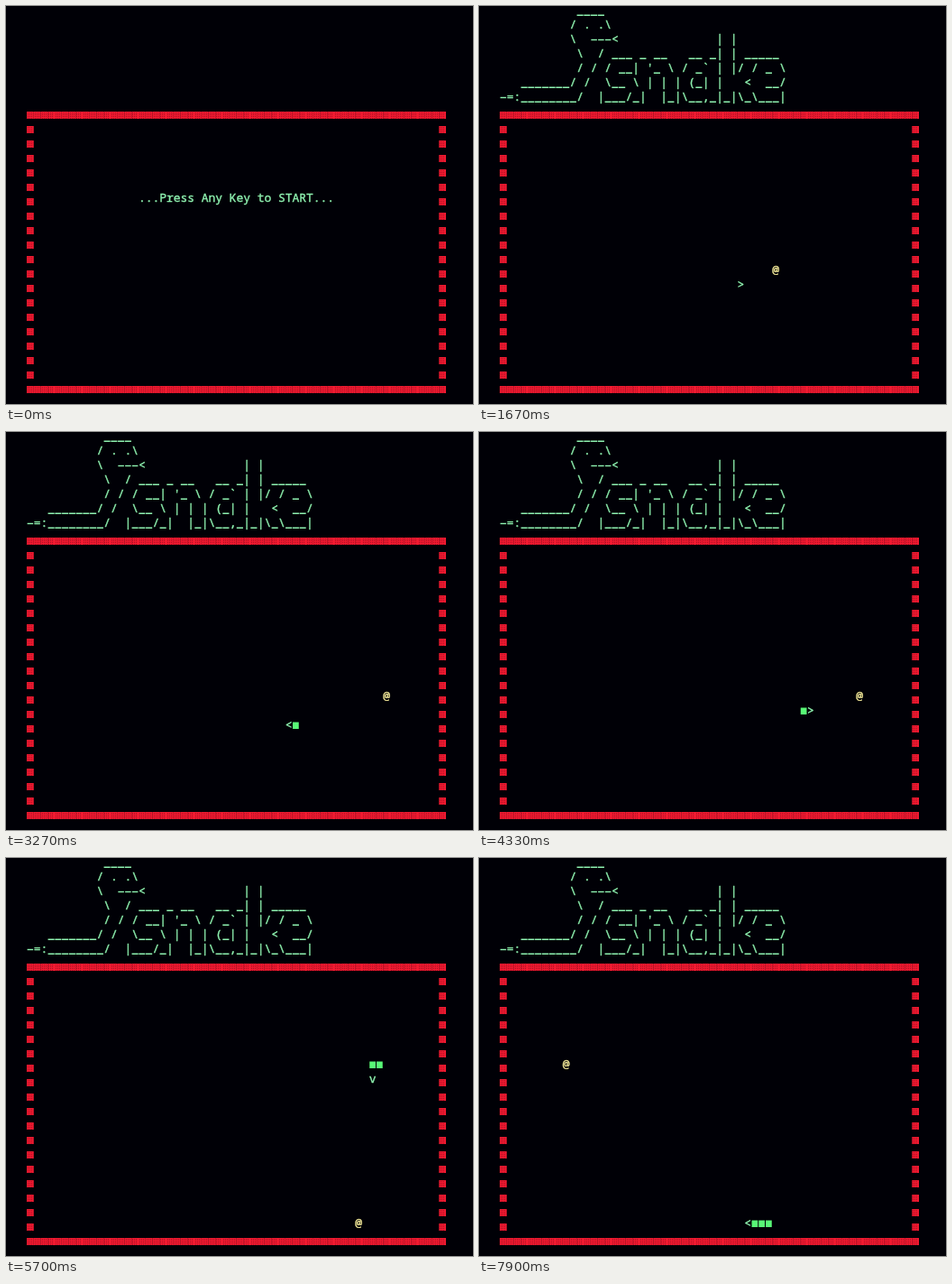
Write an HTML page with a canvas that moves like this. It is 518x441 px and loops after 8 s.

```html
<!DOCTYPE html>
<html lang="en">
<head>
<meta charset="utf-8">
<title>Terminal snake</title>
<style>
  html, body { margin: 0; width: 100%; height: 100%; overflow: hidden; background: #000006; }
  canvas { display: block; }
</style>
</head>
<body>
<canvas id="stage" width="518" height="441"></canvas>
<script>
const ctx = document.getElementById('stage').getContext('2d');
const LOOP = 8000, GAME_START = 800;
const FIRST_MOVE = 712, MOVE = 90.3;
const LEFT = 23, CELL = 7.75, LINE = 16;
const COLS = 60, TOP_ROW = 7, BOTTOM_ROW = 26;
const BACK = '#000006', MINT = '#8ef2b0', GREEN = '#58f876', YELLOW = '#f8ee9c', RED = '#f01a30';

const LOGO = [
  String.raw`           ____`,
  String.raw`          / . .\ `,
  String.raw`          \  ---<              | |`,
  String.raw`           \  / ___ _ __   __ _| | _____`,
  String.raw`           / / / __| '_ \ / _${'`'} | |/ / _ \ `,
  String.raw`   _______/ /  \__ \ | | | (_| |   <  __/`,
  String.raw`-=:________/  |___/_|  |_|\__,_|_|\_\___|`
];

// Turns of the snake: direction and number of cells
const ROUTE = 'R14 U5 R1 D6 L4 U1 R16 U5 L2 D11 L14';
const DIRS = { R: [1, 0, '>'], L: [-1, 0, '<'], U: [0, -1, '^'], D: [0, 1, 'v'] };

const path = [{ x: 24, y: 19, head: '>' }];
for (const leg of ROUTE.split(' ')) {
  const [dx, dy, head] = DIRS[leg[0]];
  for (let i = 0; i < +leg.slice(1); i++) {
    const last = path[path.length - 1];
    path.push({ x: last.x + dx, y: last.y + dy, head });
  }
}

// Steps of the path on which the snake eats; the last food stays uneaten
const MEALS = [24, 48, 67];
const food = [...MEALS.map(step => path[step]), { x: 9, y: 14 }];

const colX = col => LEFT + col * CELL;
const rowY = row => 5 + row * LINE;

function glyph(ch, col, row, color) {
  if (ch === ' ') return;
  const x = colX(col), y = rowY(row);
  ctx.fillStyle = ctx.strokeStyle = color;
  if (ch === '_') {
    ctx.fillRect(x + 0.3, y + 4.5, CELL - 0.6, 1.5);
  } else if (ch === '-') {
    ctx.fillRect(x + 0.6, y - 0.2, CELL - 1.2, 1.4);
  } else {
    ctx.fillText(ch, x + CELL / 2, y + 4.4);
    ctx.strokeText(ch, x + CELL / 2, y + 4.4);
  }
}

function print(text, col, row, color) {
  [...text].forEach((ch, i) => glyph(ch, col + i, row, color));
}

function brick(col, row) {
  const x = colX(col), y = rowY(row);
  ctx.fillStyle = RED;
  ctx.fillRect(x, y, CELL, 8);
  ctx.fillStyle = 'rgba(100, 0, 20, 0.5)';
  for (let j = 1; j < 8; j += 2)
    for (let i = 1; i < 7; i += 2) ctx.fillRect(Math.round(x) + i, y + j, 1, 1);
}

function drawWalls() {
  for (let c = 0; c < COLS; c++) {
    brick(c, TOP_ROW);
    brick(c, BOTTOM_ROW);
  }
  for (let r = TOP_ROW + 1; r < BOTTOM_ROW; r++) {
    brick(0, r);
    brick(COLS - 1, r);
  }
}

function drawGame(t) {
  LOGO.forEach((line, row) => print(line, 0, row, MINT));
  const step = Math.min(Math.floor((t - FIRST_MOVE) / MOVE), path.length - 1);
  const eaten = MEALS.filter(meal => meal <= step).length;
  glyph('@', food[eaten].x, food[eaten].y, YELLOW);
  ctx.fillStyle = GREEN;
  for (const part of path.slice(step - eaten, step))
    ctx.fillRect(colX(part.x) + 0.5, rowY(part.y) - 3.5, CELL - 1, 7.5);
  const front = path[step];
  glyph(front.head, front.x, front.y, MINT);
}

function draw(t) {
  ctx.fillStyle = BACK;
  ctx.fillRect(0, 0, 518, 441);
  ctx.font = '13px "Noto Sans Mono", "DejaVu Sans Mono", monospace';
  ctx.textAlign = 'center';
  ctx.lineWidth = 0.4;
  drawWalls();
  if (t < GAME_START) print('...Press Any Key to START...', 16, 13, MINT);
  else drawGame(t);
}

const began = performance.now();
function tick() {
  draw((performance.now() - began) % LOOP);
  requestAnimationFrame(tick);
}
tick();
</script>
</body>
</html>
```
